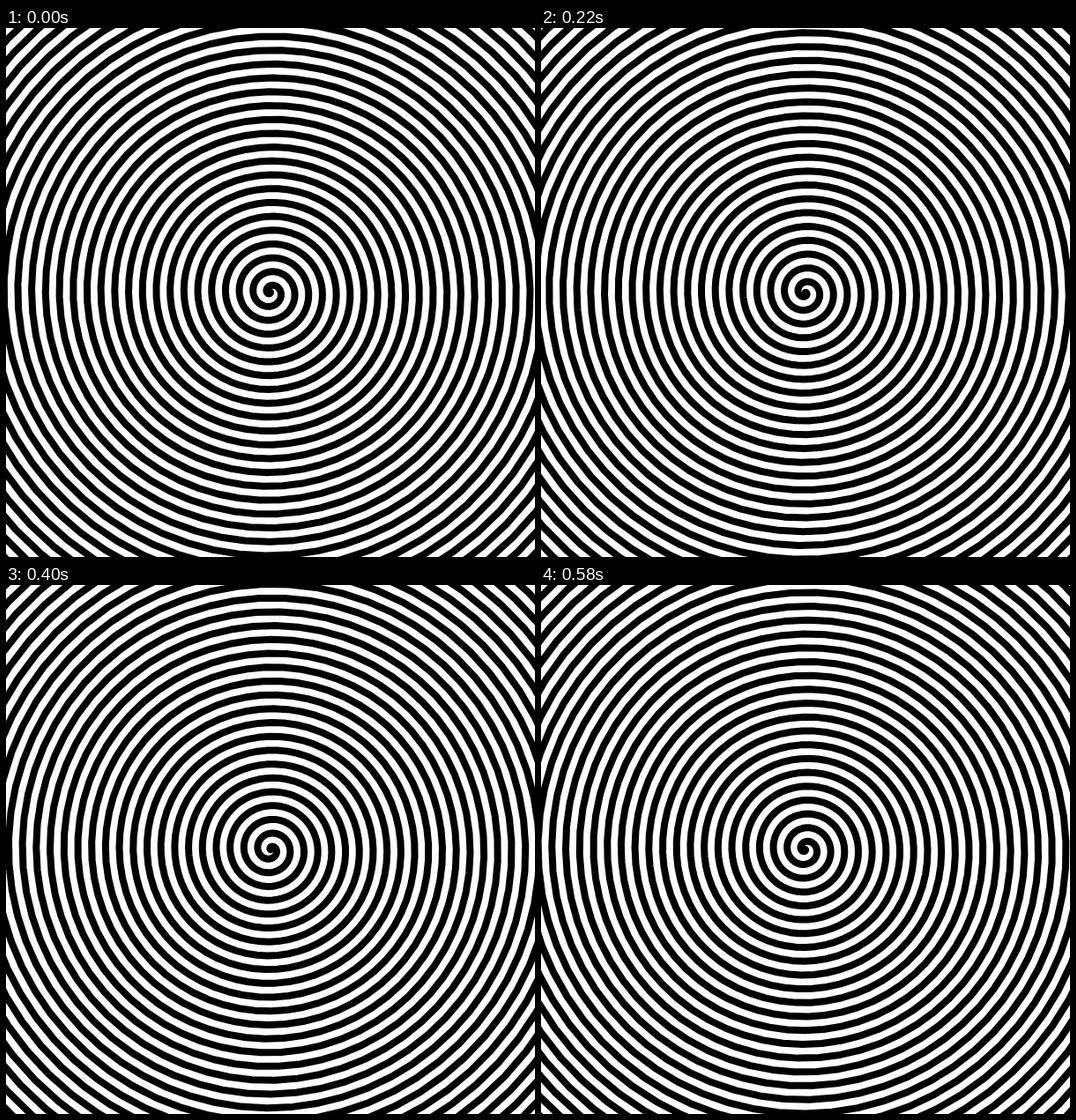
Animation of 600x600 px, one loop 0.6 s. Source, as an HTML page with a canvas:

```html
<!DOCTYPE html>
<html>
<head>
<meta charset="utf-8">
<title>Spiral</title>
<style>
  html, body { margin: 0; width: 100%; height: 100%; overflow: hidden; background: #fff; }
  canvas { display: block; }
</style>
</head>
<body>
<canvas id="stage" width="600" height="600"></canvas>
<script>
const ctx = document.getElementById('stage').getContext('2d');
const LOOP = 600, TICK = 20, TURNS = 2;
const GROWTH = 2.5;   // pixels of radius per radian
const STEP = 0.1;     // radians per straight segment
const MAX_ANGLE = 176;

const spiral = new Path2D();
for (let i = 0; i * STEP < MAX_ANGLE; i++) {
  const a = i * STEP, r = GROWTH * a;
  spiral.lineTo(r * Math.cos(a), r * Math.sin(a));
}

function draw(now) {
  const tick = Math.floor(now % LOOP / TICK);
  const turn = tick * TICK / LOOP * TURNS;
  ctx.setTransform(1, 0, 0, 1, 0, 0);
  ctx.fillStyle = '#fff';
  ctx.fillRect(0, 0, 600, 600);
  ctx.translate(300, 300);
  ctx.rotate(Math.PI / 2 + turn * 2 * Math.PI);
  ctx.lineWidth = 8;
  ctx.lineCap = ctx.lineJoin = 'round';
  ctx.stroke(spiral);
}

const start = performance.now();
(function frame() {
  draw(performance.now() - start);
  requestAnimationFrame(frame);
})();
</script>
</body>
</html>
```
